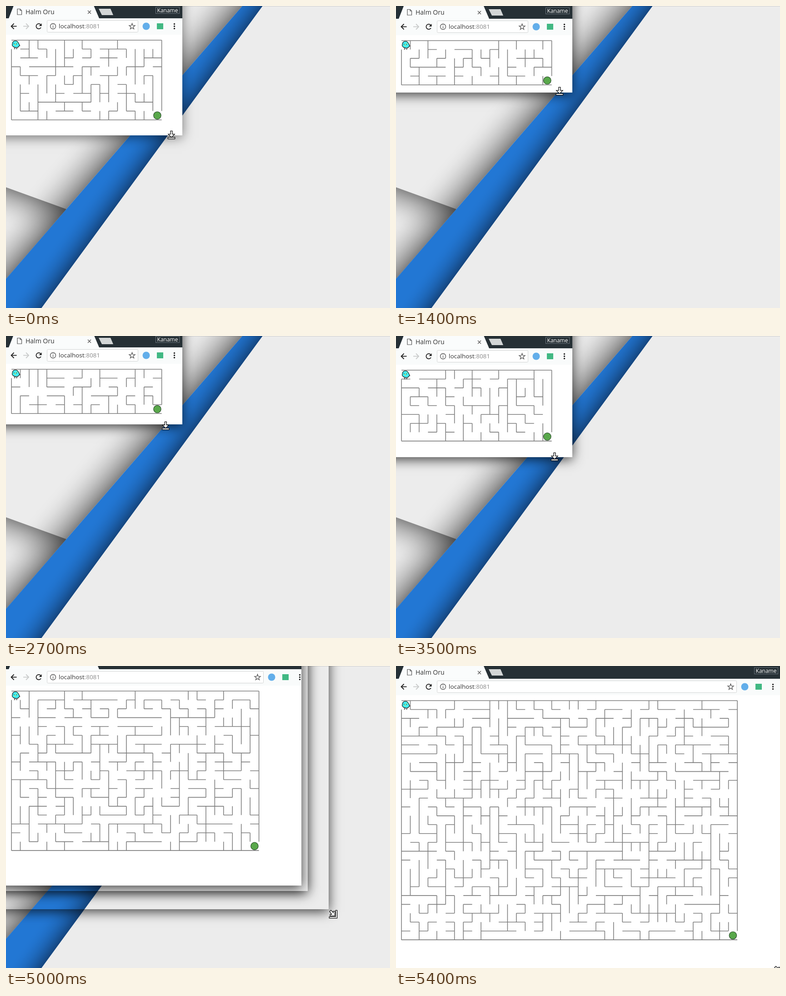
An HTML page with a canvas that plays this animation: 845 by 663 pixels, repeating every 9.6 s.

```html
<!DOCTYPE html>
<html lang="en">
<head>
<meta charset="utf-8">
<title>Maze window</title>
<style>
html, body { margin: 0; width: 100%; height: 100%; overflow: hidden; background: #ececec; }
canvas { display: block; }
</style>
</head>
<body>
<canvas id="stage" width="845" height="663"></canvas>
<script>
const ctx = document.getElementById('stage').getContext('2d');
const SW = 845, SH = 663, LOOP = 9600, STEP = 100;
const CELL = 19.45, PITCH = 22.2;
const FONT = '"Open Sans", "Noto Sans", sans-serif';

// Eased progress from 0 to 1 between two times.
function ease(t, from, to) {
  const p = Math.min(1, Math.max(0, (t - from) / (to - from)));
  return p * p * (3 - 2 * p);
}

const widthAt = t => Math.round(388 + 459 * ease(t, 4700, 5170));
const heightAt = t => Math.round(284 - 120 * ease(t, 250, 1900)
  + 102 * ease(t, 2250, 3500) + 414 * ease(t, 4700, 5200));

function poly(...p) {
  ctx.beginPath();
  for (let i = 0; i < p.length; i += 2) ctx.lineTo(p[i], p[i + 1]);
  ctx.closePath();
}

function line(...p) {
  ctx.beginPath();
  for (let i = 0; i < p.length; i += 2) ctx.lineTo(p[i], p[i + 1]);
  ctx.stroke();
}

function fill(color) {
  ctx.fillStyle = color;
  ctx.fill();
}

function box(x, y, w, h, color) {
  ctx.fillStyle = color;
  ctx.fillRect(x, y, w, h);
}

function pen(color, width) {
  ctx.strokeStyle = color;
  ctx.lineWidth = width;
}

function disc(x, y, r, color) {
  ctx.beginPath();
  ctx.arc(x, y, r, 0, 7);
  fill(color);
}

function text(s, x, y, size, color, align = 'left') {
  ctx.font = `${size}px ${FONT}`;
  ctx.textAlign = align;
  ctx.fillStyle = color;
  ctx.fillText(s, x, y);
}

// Shadow fading from an edge point along a unit normal, inside the current path.
function shade(x, y, nx, ny, len, rgb, alpha) {
  const g = ctx.createLinearGradient(x, y, x + nx * len, y + ny * len);
  for (let k = 0; k <= 1; k += .125) g.addColorStop(k, `rgba(${rgb},${alpha * (1 - k) ** 2})`);
  fill(g);
}

function wallpaper() {
  const bandShade = () => shade(520, 0, -.755, -.656, 92, '0,0,0', .45);
  box(0, 0, SW, SH, '#ececec');
  poly(0, 0, 520, 0, 0, 599);
  bandShade();
  poly(0, 398, 133, 446, 0, 599);
  fill('#ececec');
  bandShade();
  shade(0, 398, -.34, .94, 85, '0,0,0', .42);
  poly(520, 0, 564.5, 0, 78, SH, 0, SH, 0, 599);
  fill('#2277d4');
  shade(564.5, 0, -.806, -.592, 62, '8,24,48', .52);
  box(0, 0, SW, 1, 'rgba(0,0,0,.12)');
}

function windowShadow(w, h, alpha) {
  ctx.save();
  ctx.beginPath();
  ctx.rect(0, 0, SW, SH);
  ctx.rect(0, 0, w, h);
  ctx.clip('evenodd');
  ctx.shadowColor = `rgba(0,0,0,${alpha})`;
  ctx.shadowBlur = 25;
  ctx.shadowOffsetY = 5;
  box(-60, -60, w + 60, h + 60, '#555');
  ctx.restore();
}

function random(seed) {
  return () => {
    seed = seed + 0x6D2B79F5 | 0;
    let v = Math.imul(seed ^ seed >>> 15, 1 | seed);
    v = v + Math.imul(v ^ v >>> 7, 61 | v) ^ v;
    return ((v ^ v >>> 14) >>> 0) / 4294967296;
  };
}

// Walls grow as a random spanning forest rooted in the border.
function makeMaze(cols, rows, seed) {
  const rnd = random(seed), root = [], edges = [], walls = [];
  const find = i => root[i] === i ? i : (root[i] = find(root[i]));
  const n = cols + 1;
  for (let y = 0; y <= rows; y++) {
    for (let x = 0; x <= cols; x++) {
      const border = x === 0 || y === 0 || x === cols || y === rows;
      root.push(border ? 0 : y * n + x);
      if (x < cols) edges.push([x, y, x + 1, y]);
      if (y < rows) edges.push([x, y, x, y + 1]);
    }
  }
  for (let i = edges.length - 1; i > 0; i--) {
    const j = Math.floor(rnd() * (i + 1));
    [edges[i], edges[j]] = [edges[j], edges[i]];
  }
  for (const e of edges) {
    const a = find(e[1] * n + e[0]), b = find(e[3] * n + e[2]);
    if (a !== b) {
      root[Math.max(a, b)] = Math.min(a, b);
      walls.push(e);
    }
  }
  walls.push([0, 0, cols, 0], [0, rows, cols, rows], [0, 1, 0, rows], [cols, 0, cols, rows - 1]);
  return walls;
}

function bird() {
  pen('#111', 1.1);
  line(7.5, 16, 7.5, 19, 5.5, 19);
  line(12, 16, 12, 19, 10, 19);
  ctx.beginPath();
  ctx.moveTo(1.5, 11);
  ctx.bezierCurveTo(2, 4, 4, 1.5, 9, 1.5);
  ctx.bezierCurveTo(15, 1.5, 16, 8, 18.5, 12);
  ctx.lineTo(16.5, 13);
  ctx.bezierCurveTo(15, 17.5, 4, 17.5, 1.5, 11);
  ctx.closePath();
  fill('#44eef2');
  ctx.stroke();
  box(7, 9, 2.5, 2, '#e8d83c');
  box(11, 5.5, 2, 1.5, '#e8d83c');
  box(5, 7, 1.2, 1.6, '#222');
  box(10.5, 7.5, 1.2, 1.6, '#222');
}

function maze(cols, rows, seed) {
  ctx.save();
  ctx.translate(12, 76);
  ctx.beginPath();
  for (const [a, b, c, d] of makeMaze(cols, rows, seed)) {
    ctx.moveTo(a * CELL, b * CELL);
    ctx.lineTo(c * CELL, d * CELL);
  }
  pen('#808080', 1.6);
  ctx.stroke();
  disc((cols - .5) * CELL, (rows - .5) * CELL, 8.2, '#59a84b');
  pen('#2f5230', 1.2);
  ctx.stroke();
  bird();
  ctx.restore();
}

function titleBar(w) {
  box(0, -2, w, 30, '#263035');
  poly(6, 28, 17, 0, 193, 0, 205, 28);
  fill('#fafcfc');
  poly(204, 7, 230, 7, 236, 21, 211, 21);
  fill('#d3d6d6');
  pen('#555', 1.2);
  poly(25, 7.5, 31, 7.5, 34.5, 11, 34.5, 20, 25, 20);
  ctx.stroke();
  line(31, 7.5, 31, 11, 34.5, 11);
  line(180, 11, 187, 18);
  line(187, 11, 180, 18);
  text('Halm Oru', 43, 19, 14, '#333');
  pen('#67727a', 1);
  ctx.strokeRect(w - 58.5, 3.5, 52, 14);
  text('Kaname', w - 32.5, 15, 12, '#fff', 'center');
}

function arrow(x, dir, color) {
  pen(color, 1.8);
  line(x - 6 * dir, 45.5, x + 6 * dir, 45.5);
  line(x, 39.5, x + 6 * dir, 45.5, x, 51.5);
}

function star(x, y) {
  ctx.beginPath();
  for (let i = 0; i < 10; i++) {
    const r = i % 2 ? 2.8 : 6.8, a = (i * .2 - .5) * Math.PI;
    ctx.lineTo(x + r * Math.cos(a), y + r * Math.sin(a));
  }
  ctx.closePath();
  ctx.stroke();
}

function toolBar(w) {
  box(0, 28, w, 36, '#f9fbfb');
  arrow(17.5, -1, '#222');
  arrow(44, 1, '#c8caca');
  pen('#222', 1.8);
  ctx.beginPath();
  ctx.arc(72, 45.5, 5.6, .5, 5.5);
  ctx.stroke();
  poly(78.5, 39, 78.5, 45, 72.5, 45);
  fill('#222');

  ctx.beginPath();
  ctx.roundRect(90.5, 32.5, w - 188, 26, 2);
  fill('#fff');
  pen('#d2d4d4', 1);
  ctx.stroke();
  pen('#555', 1.3);
  ctx.beginPath();
  ctx.arc(103.5, 45.5, 6, 0, 7);
  ctx.stroke();
  line(103.5, 44.5, 103.5, 49);
  line(103.5, 41.8, 103.5, 43.2);
  text('localhost', 116, 50, 13.5, '#333');
  text(':8081', 116 + ctx.measureText('localhost').width, 50, 13.5, '#8a8a8a');

  star(w - 110.5, 46);
  disc(w - 79.5, 45.5, 8, '#62aeea');
  box(w - 56, 39, 14, 13, '#41b883');
  for (let y = 40.5; y < 52; y += 5) disc(w - 17.5, y, 1.7, '#222');
}

function outlined(...p) {
  poly(...p);
  ctx.stroke();
  fill('#fff');
}

function cursor(x, y, corner) {
  ctx.save();
  ctx.translate(x, y);
  pen('#111', 2.6);
  if (corner) {
    outlined(6, -8, 8, -8, 8, 8, -8, 8, -8, 6, 6, 6);
    outlined(-7, -6, -5, -8, 1, -2, 1, -6, 3, -6, 3, 3, -6, 3, -6, 1, -2, 1);
  } else {
    outlined(-7, 6, 7, 6, 7, 8, -7, 8);
    outlined(-1.3, -8, 1.3, -8, 1.3, -1, 5.5, -1, 0, 4.5, -5.5, -1, -1.3, -1);
  }
  ctx.restore();
}

function draw(t) {
  // The painted window trails the dragged frame a little.
  const w = widthAt(t - 43), h = heightAt(t - 43 * (t > 4700));
  const layoutW = widthAt(t - 33);
  const alpha = t < 400 ? .5 : .75;

  // A growing window pushes its content up.
  const speed = heightAt(t) - heightAt(t - STEP);
  const shift = h > SH ? 0 : Math.min(0, Math.round(-1 - speed / 6));

  wallpaper();
  if (widthAt(t) > w) {
    windowShadow(widthAt(t), heightAt(t), alpha);
    windowShadow(layoutW, heightAt(t - 33), alpha);
  }
  windowShadow(w, h, alpha);

  ctx.save();
  ctx.beginPath();
  ctx.rect(0, 0, w, h);
  ctx.clip();
  box(0, 0, w, h, '#fff');
  ctx.translate(0, shift);
  titleBar(layoutW);
  toolBar(layoutW);
  const cols = Math.floor(widthAt(t - 50) / PITCH);
  const rows = Math.floor((heightAt(t - 50 * (t > 4700)) - 70) / PITCH);
  maze(cols, rows, h * 31 + w);
  ctx.restore();

  if (t >= 4800) {
    cursor(Math.min(SW - 4, widthAt(t) + 10), Math.min(SH + 5, heightAt(t) + 11), true);
  } else {
    const x = 364 - 15 * ease(t, 300, 3500) + 35 * ease(t, 3700, 4400);
    cursor(x, h - 3 - 2 * shift, t >= 4400);
  }
}

let shown = -1;
function tick() {
  const t = Math.floor(performance.now() % LOOP / STEP) * STEP;
  if (t !== shown) draw(shown = t);
  requestAnimationFrame(tick);
}
tick();
</script>
</body>
</html>
```
